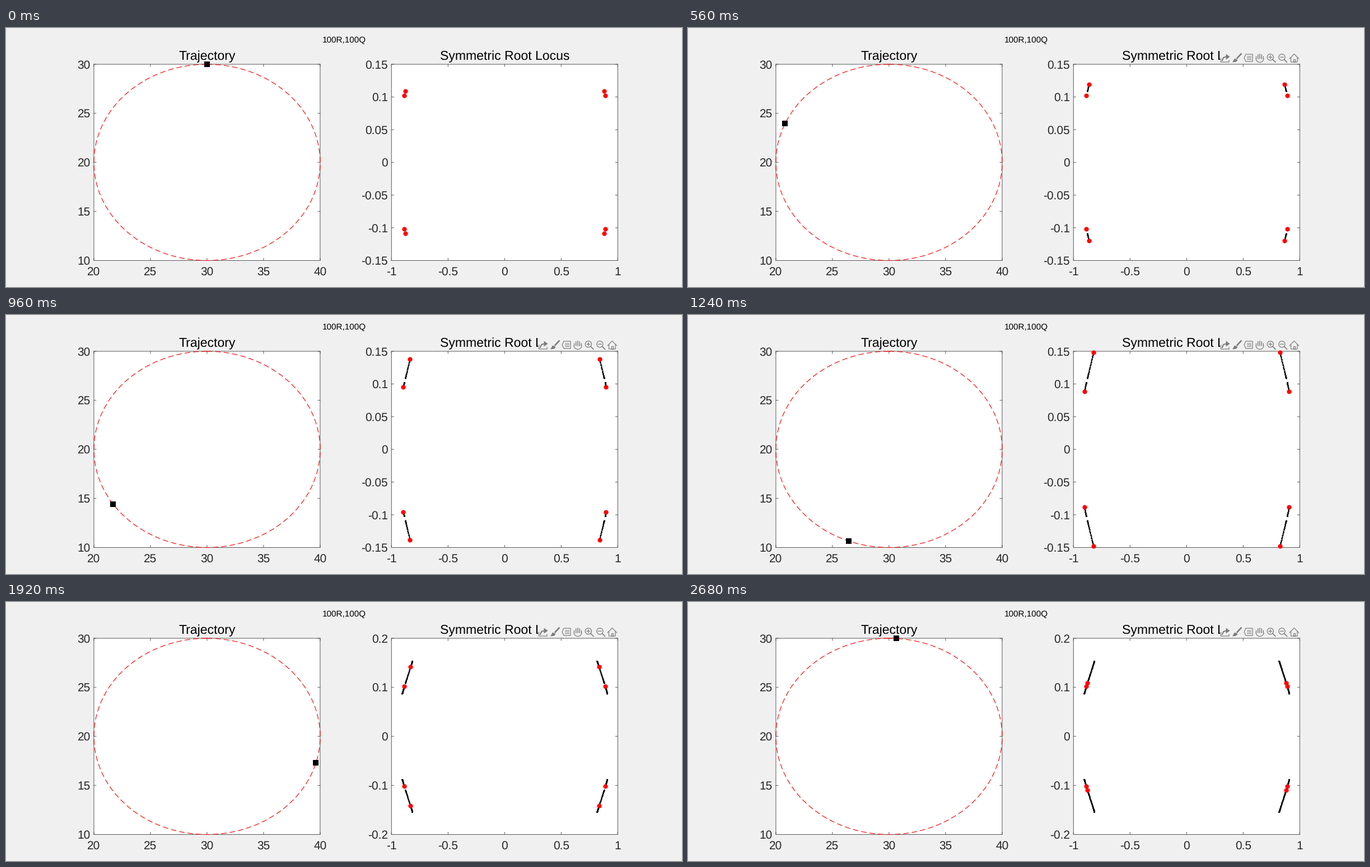
These frames come from a looping animation (1207x464 px, 2720 ms). A matplotlib script:

```python
import numpy as np
import matplotlib.pyplot as plt
from matplotlib.animation import FuncAnimation
from matplotlib.patches import Arc, Circle, Polygon, Rectangle

W, H, DPI = 1207, 464, 64
PT = 72 / DPI  # points per pixel
FRAMES, INTERVAL = 68, 40
INK, EDGE, GREY, BACK = "#262626", "#585858", "#7b7b7b", "#f0f0f0"
TOP, BOTTOM = 65, 416.5
LEFT_BOX, RIGHT_BOX = (156.9, 560.9), (688.3, 1092.3)

plt.rcParams["font.family"] = "Liberation Sans"
plt.rcParams["text.hinting"] = "no_hinting"
fig = plt.figure(figsize=(W / DPI, H / DPI), dpi=DPI, facecolor=BACK)
ax = fig.add_axes([0, 0, 1, 1])
ax.set_xlim(0, W)
ax.set_ylim(H, 0)
ax.axis("off")


def label(x, y, text, size=20.9, ha="center", color=INK):
    return ax.text(x, y, text, fontsize=size * PT, ha=ha, va="baseline", color=color, zorder=2)


def stroke(points, color=EDGE, width=1.0, z=3):
    x, y = np.transpose(points)
    return ax.plot(x, y, color=color, lw=width * PT, zorder=z, snap=False)[0]


def markers(shape, color, size, z):
    return ax.plot([], [], shape, color=color, ms=size * PT, mew=0, zorder=z, snap=False)[0]


def scale(value, lo, hi, start, end):
    return start + (np.asarray(value) - lo) / (hi - lo) * (end - start)


def ticks(lo, hi, count, start, end):
    values = np.linspace(lo, hi, count).round(3) + 0.0
    return zip(np.linspace(start, end, count), [f"{v:g}" for v in values])


def panel(box, title, lo, hi):
    x0, x1 = box
    ax.add_patch(Rectangle((x0, TOP), x1 - x0, BOTTOM - TOP, fc="white", ec=EDGE,
                           lw=PT, zorder=1, snap=False))
    label((x0 + x1) / 2, 57, title, 23, color="black")
    for x, text in ticks(lo, hi, 5, x0, x1):
        label(x, 443.2, text)
        stroke([(x, BOTTOM), (x, BOTTOM - 4)])
        stroke([(x, TOP), (x, TOP + 4)])


def y_ticks(box, lo, hi, count):
    x0, x1 = box
    parts = []
    for y, text in ticks(lo, hi, count, BOTTOM, TOP):
        parts += [label(x0 - 6.2, y + 7.4, text, ha="right"),
                  stroke([(x0, y), (x0 + 4, y)]),
                  stroke([(x1, y), (x1 - 4, y)])]
    return parts


def toolbar():
    parts = []

    def put(patch):
        parts.append(ax.add_patch(patch))

    def line(*points, width=1.2):
        parts.append(stroke(points, GREY, width, 5))

    def blob(*points):
        put(Polygon(points, fc=GREY, ec="none", zorder=5))

    outline = dict(fc="none", ec=GREY, lw=1.2 * PT, zorder=5)
    put(Rectangle((950, 44), 143, 20, fc=BACK, ec="none", zorder=4))

    # export
    line((951.5, 54), (951.5, 61), (966, 61), (966, 58))
    line((954, 58), (956, 53), (961, 51.5), width=2)
    blob((960.5, 46.5), (967.5, 51.5), (960.5, 56.5))
    # brush
    line((987.5, 46.5), (980.5, 54), width=2.6)
    blob((972, 61.5), (976, 54.5), (981.5, 57), (979, 60.5))
    # data tip
    put(Polygon([(996, 47), (1008, 47), (1008, 60), (996, 60), (993, 53.5)], **outline))
    for y in (51, 53.7, 56.5):
        line((998.5, y), (1005.5, y), width=1)
    # hand
    put(Arc((1021, 54.5), 14, 14, theta1=0, theta2=180, **{**outline, "fc": None}))
    for k in range(5):
        line((1014.5 + 3.2 * k, 55), (1014.5 + 3.2 * k, 46.8 + 1.1 * (k - 2) ** 2), width=1.4)
    # zoom in, zoom out
    for x, plus in ((1039.8, True), (1060.4, False)):
        put(Circle((x, 52.3), 5.6, **outline))
        line((x + 4, 56.3), (x + 9, 61.3), width=1.6)
        line((x - 3, 52.3), (x + 3, 52.3))
        if plus:
            line((x, 49.3), (x, 55.3))
    # home
    line((1074, 55), (1082.3, 46.5), (1090.6, 55))
    line((1076.5, 53), (1076.5, 61), (1088, 61), (1088, 53))
    put(Rectangle((1080.6, 56), 3.4, 5, **outline))
    return parts


def swell(s, start, peak, end):
    """Rise from 0 to 1 between start and peak, then fall back by end."""
    up = np.clip((s - start) / (peak - start), 0, 1)
    down = np.clip((s - peak) / (end - peak), 0, 1)
    return np.sin(np.pi / 2 * (up - down)) ** 2


# The simulation runs at a fixed step; each frame shows the latest finished one
def step_at(i):
    return max(0, round(1.71 * i - 2.52))


steps = np.arange(step_at(FRAMES - 1) + 1)
angle = np.radians(90 + 3.18 * steps)

# Imaginary parts of the two root branches; real parts follow linearly
high = .109 + .0446 * swell(steps, 0, 65, 108)
low = .102 - .0145 * swell(steps, 25, 55, 82)
re = np.stack([.8787 - 1.39 * (high - .109), .8886 - 1.25 * (low - .1015)], 1)
im = np.stack([high, low], 1)


def roots(part, limit):
    a, b = re[part].ravel(), im[part].ravel()
    x = np.concatenate([a, a, -a, -a])
    y = np.concatenate([b, -b, b, -b])
    return scale(x, -1, 1, *RIGHT_BOX), scale(y, -limit, limit, BOTTOM, TOP)


def on_circle(a):
    return (scale(30 + 10 * np.cos(a), 20, 40, *LEFT_BOX),
            scale(20 + 10 * np.sin(a), 10, 30, BOTTOM, TOP))


label(603.8, 26, "100R,100Q", 15.3, color="black")
panel(LEFT_BOX, "Trajectory", 20, 40)
panel(RIGHT_BOX, "Symmetric Root Locus", -1, 1)
y_ticks(LEFT_BOX, 10, 30, 5)
near = y_ticks(RIGHT_BOX, -.15, .15, 7)
far = y_ticks(RIGHT_BOX, -.2, .2, 5)
tools = toolbar()

turn = np.pi / 2 + np.linspace(0, 2 * np.pi, 400)
ring = stroke(np.transpose(on_circle(turn)), "red", 1.15)
ring.set_dash_capstyle("butt")
ring.set_linestyle((0, (11 / 1.15 / PT, 6 / 1.15 / PT)))

trail = markers("o", "black", 2.2, 6)
dots = markers("o", "red", 8.2, 7)
car = markers("s", "black", 10.8, 7)


def show(parts, on):
    for part in parts:
        part.set_visible(on)


def draw(i):
    s = step_at(i)
    wide = high[:s + 1].max() > .15
    limit = .2 if wide else .15
    show(near, not wide)
    show(far, wide)
    show(tools, i > 0)
    trail.set_data(*roots(slice(0, s + 1), limit))
    dots.set_data(*roots(slice(s, s + 1), limit))
    car.set_data(*on_circle(angle[s:s + 1]))
    return trail, dots, car


anim = FuncAnimation(fig, draw, frames=FRAMES, init_func=lambda: draw(0),
                     interval=INTERVAL, repeat=True, repeat_delay=0, blit=False)
plt.show()
```
